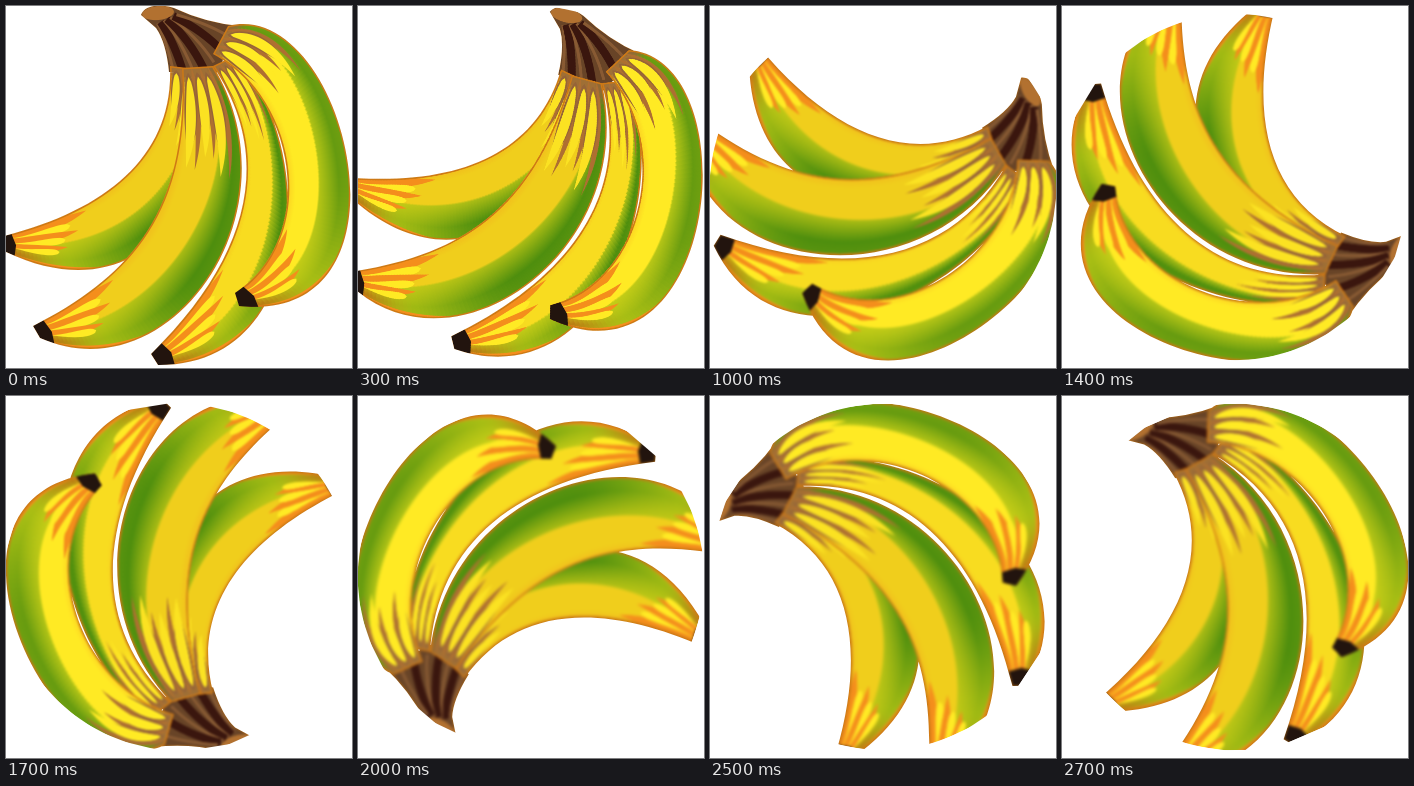
These frames come from a looping animation (346 by 362 pixels, 2.8 s). An HTML page with a canvas:

```html
<!DOCTYPE html>
<html lang="en">
<head>
<meta charset="utf-8">
<title>Spinning bananas</title>
<style>
  html, body { margin: 0; width: 100%; height: 100%; overflow: hidden; background: #fff; }
  canvas { display: block; width: 346px; height: 362px; }
</style>
</head>
<body>
<canvas id="stage" width="346" height="362"></canvas>
<script>
const W = 346, H = 362, CX = W / 2, CY = H / 2;
const PAD = 20, SCALE = 2, STEP = 100, STEPS = 28;

const GOLD = [240, 206, 28], BRIGHT = [255, 234, 36], ORANGE = [244, 142, 28];
const LIME = [198, 206, 22], GREEN = [78, 142, 14], RUST = [190, 112, 18];
const BARK = [150, 100, 56], BLACK = [34, 20, 14];

const rgb = c => `rgb(${c.map(Math.round)})`;
const lerp = (a, b, t) => a + (b - a) * t;
const mix = (a, b, t) => a.map((x, i) => lerp(x, b[i], t));
const smooth = (a, b, x) => {
  const t = Math.min(1, Math.max(0, (x - a) / (b - a)));
  return t * t * (3 - 2 * t);
};

function bezier([a, b, c, d], t) {
  const s = 1 - t;
  return [0, 1].map(i =>
    s * s * s * a[i] + 3 * s * s * t * b[i] + 3 * s * t * t * c[i] + t * t * t * d[i]);
}

// Each banana spans two edge curves that run from the crown to the tip.
const bananas = [
  { left: [[164, 60], [168, 150], [100, 205], [-6, 231]],
    right: [[200, 64], [215, 200], [130, 312], [-6, 243]],
    skin: GOLD, under: GREEN, face: 0.45 },
  { left: [[176, 62], [183, 205], [125, 270], [27, 320]],
    right: [[207, 60], [295, 205], [165, 390], [34, 332]],
    skin: GOLD, under: GREEN, face: 0.45 },
  { left: [[207, 60], [268, 150], [245, 250], [145, 348]],
    right: [[228, 50], [310, 130], [310, 360], [152, 359]],
    skin: mix(GOLD, BRIGHT, 0.5), under: GREEN, face: 0.55 },
  { left: [[207, 48], [294, 95], [310, 235], [229, 287]],
    right: [[222, 20], [340, -10], [420, 320], [233, 300]],
    skin: BRIGHT, under: mix(GREEN, LIME, 0.2), face: 0.45 }
];

// Place on a banana: u across from left to right, v along from crown to tip.
function spot(b, u, v) {
  const l = bezier(b.left, v), r = bezier(b.right, v);
  return mix(l, r, u);
}

const faceEdge = (b, v) => b.face + 0.35 * (1 - v) ** 3;

function outline(b) {
  const p = new Path2D(), [r0, r1, r2, r3] = b.right;
  p.moveTo(...b.left[0]);
  p.bezierCurveTo(...b.left.slice(1).flat());
  p.lineTo(...r3);
  p.bezierCurveTo(...r2, ...r1, ...r0);
  p.closePath();
  return p;
}

const stem = new Path2D(
  'M168 2C152-3 138 0 135 9L150 22Q160 36 163 66L210 68L234 20Q200 17 168 2Z');
const bodies = bananas.map(outline);
const shape = new Path2D();
[stem, ...bodies].forEach(p => shape.addPath(p));

function polygon(g, color, pts) {
  g.fillStyle = rgb(color);
  g.beginPath();
  pts.forEach(p => g.lineTo(...p));
  g.fill();
}

// Teardrop along a banana: round head at v0, point at v1.
function streak(g, b, color, u, v0, v1, w) {
  const near = [], far = [];
  for (let s = 0; s <= 1.001; s += 0.05) {
    const half = 2.6 * w * Math.sqrt(s) * Math.max(0, 1 - s), v = lerp(v0, v1, s);
    near.push(spot(b, u - half, v));
    far.unshift(spot(b, u + half, v));
  }
  polygon(g, color, near.concat(far));
}

// Colours of one slice across a banana, as gradient stops.
function slice(b, v) {
  const edge = faceEdge(b, v), tip = smooth(0.78, 0.95, v), pale = smooth(0.5, 0.88, v);
  const rim = mix(b.skin, ORANGE, 0.25 + 0.6 * tip);
  const under = mix(mix(b.under, LIME, 0.75 * pale), RUST, smooth(0.8, 1, v));
  const crown = 0.9 * (1 - smooth(0.01, 0.06, v));
  return [
    [0, rim], [0.12, mix(b.skin, ORANGE, 0.5 * tip)], [edge, mix(b.skin, ORANGE, 0.3 * tip)],
    [edge + 0.03, mix(mix(b.skin, LIME, 0.8), under, 0.3)],
    [lerp(edge, 1, 0.65), under], [1, mix(under, LIME, 0.1)]
  ].map(([at, c]) => [at, mix(c, BARK, crown)]);
}

function drawBanana(g, b, i) {
  g.save();
  g.clip(bodies[i]);
  const n = 90;
  for (let k = 0; k < n; k++) {
    const v = k / n, end = Math.min(1, v + 1.6 / n);
    const grad = g.createLinearGradient(...spot(b, 0, v), ...spot(b, 1, v));
    slice(b, v).forEach(([at, c]) => grad.addColorStop(Math.min(1, at), rgb(c)));
    g.fillStyle = grad;
    g.beginPath();
    [[-0.1, v], [1.1, v], [1.1, end], [-0.1, end]].forEach(p => g.lineTo(...spot(b, ...p)));
    g.fill();
  }
  // Bright lobes under the crown, split by bark-coloured creases.
  for (let j = 0; j < 3; j++) {
    const u = 0.17 + 0.26 * j, reach = 0.19 + 0.04 * ((j + i) % 2);
    streak(g, b, mix(BARK, ORANGE, 0.25), u + 0.13, 0, reach + 0.03, 0.055);
    streak(g, b, BARK, u, 0.012, reach, 0.13);
    streak(g, b, mix(b.skin, BRIGHT, 0.7), u, 0.022, reach + 0.03, 0.095);
  }
  // Orange tongues rising from the tip, with yellow glints between them.
  for (let j = 0; j < 3; j++) {
    streak(g, b, ORANGE, 0.08 + 0.24 * j, 1, 0.7 + 0.05 * j, 0.11);
    streak(g, b, BRIGHT, 0.2 + 0.22 * j, 0.77 + 0.03 * j, 0.96, 0.075);
  }
  streak(g, b, ORANGE, 0.98, 1, 0.72, 0.06);
  g.lineWidth = 3;
  g.strokeStyle = rgb(mix(RUST, ORANGE, 0.3));
  g.stroke(bodies[i]);
  polygon(g, BLACK, [[-0.1, 0.965], [0.5, 0.955], [1.1, 0.965], [1.1, 1], [-0.1, 1]]
    .map(p => spot(b, ...p)));
  g.restore();
}

function drawStem(g) {
  g.save();
  g.clip(stem);
  g.fillStyle = rgb(mix(BARK, BLACK, 0.4));
  g.fill(stem);
  // Ribs fan out from the knob to the crown.
  const rim = [[163, 66], [185, 72], [212, 66], [230, 24]], ribs = 7;
  for (let k = 0; k < ribs; k++) {
    const t = (k + 0.5) / ribs, [x, y] = bezier(rim, t);
    const from = [lerp(150, 172, t), lerp(18, 8, t)];
    g.lineWidth = k % 2 ? 8 : 3;
    g.strokeStyle = rgb(k % 2 ? [58, 22, 14] : mix(BARK, BLACK, 0.12));
    g.beginPath();
    g.moveTo(...from);
    g.quadraticCurveTo(lerp(from[0], x, 0.6), lerp(from[1], y, 0.4), x, y);
    g.stroke();
  }
  g.fillStyle = rgb(mix(BARK, ORANGE, 0.3));
  g.beginPath();
  g.ellipse(152, 7, 16, 7, -0.1, 0, 7);
  g.fill();
  g.restore();
}

function paint() {
  const c = document.createElement('canvas');
  c.width = (W + 2 * PAD) * SCALE;
  c.height = (H + 2 * PAD) * SCALE;
  const g = c.getContext('2d');
  g.scale(SCALE, SCALE);
  g.translate(PAD, PAD);
  // Spare colour outside the outline keeps softened edges from fading.
  g.lineWidth = 12;
  g.strokeStyle = rgb(RUST);
  g.stroke(shape);
  drawStem(g);
  bananas.forEach((b, i) => drawBanana(g, b, i));
  return c;
}

// The spin starts at 6.2 degrees a step and soon settles at 16.6.
function angle(n) {
  const ease = 0.8, shift = 11;
  const gain = ease * (Math.log1p(Math.exp((n - shift) / ease)));
  return (6.2 * n + 10.4 * gain) * Math.PI / 180;
}

const art = paint();
const ctx = document.getElementById('stage').getContext('2d');

function turn(a) {
  ctx.setTransform(1, 0, 0, 1, CX, CY);
  ctx.rotate(a);
  ctx.translate(-CX, -CY);
}

function draw(n) {
  ctx.setTransform(1, 0, 0, 1, 0, 0);
  ctx.fillStyle = '#fff';
  ctx.fillRect(0, 0, W, H);
  ctx.save();
  // Every earlier turn has already cropped the picture to the stage.
  for (let k = 0; k < n; k++) {
    turn(angle(n) - angle(k));
    ctx.beginPath();
    ctx.rect(0, 0, W, H);
    ctx.clip();
  }
  turn(angle(n));
  ctx.clip(shape);
  ctx.filter = n ? `blur(${0.3 * Math.sqrt(n)}px)` : 'none';
  ctx.drawImage(art, -PAD, -PAD, W + 2 * PAD, H + 2 * PAD);
  ctx.restore();
}

const began = performance.now();
let shown = -1;

function tick() {
  const n = Math.floor((performance.now() - began) / STEP) % STEPS;
  if (n !== shown) draw(shown = n);
  requestAnimationFrame(tick);
}
tick();
</script>
</body>
</html>
```
